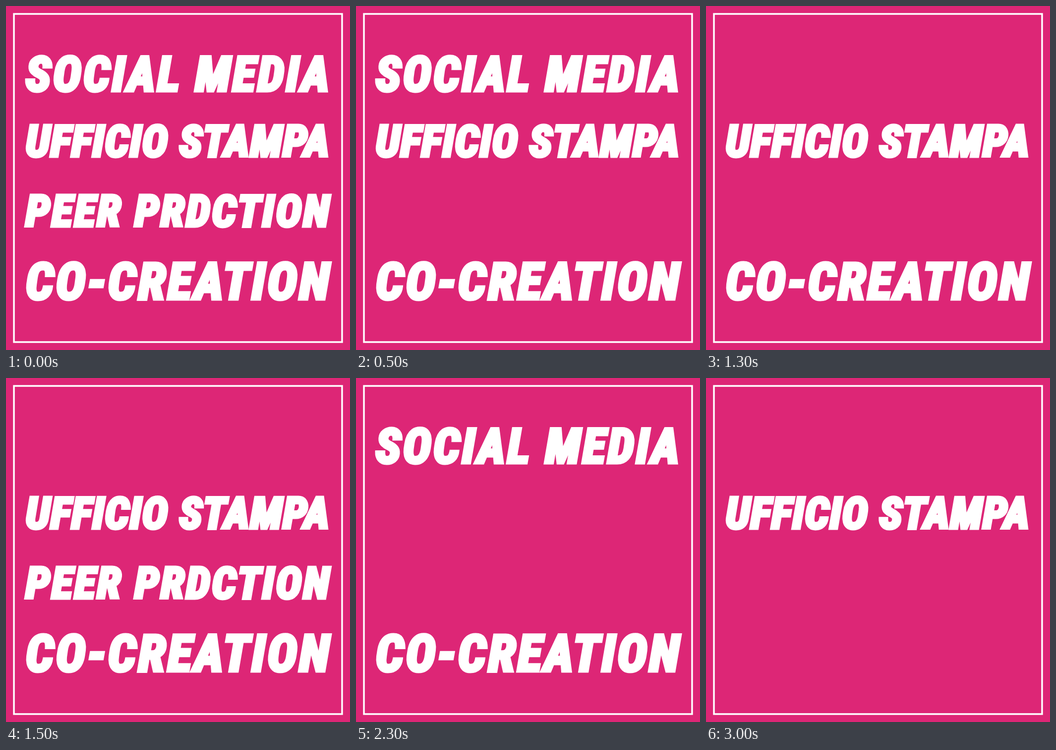
An HTML page that plays this animation: 694x694 px, repeating every 3.5 s.

```html
<!DOCTYPE html>
<html lang="it">
<head>
<meta charset="utf-8">
<title>Services</title>
<style>
html, body { margin: 0; height: 100%; overflow: hidden; background: #dd2676; }
svg { display: block; width: 100vw; height: 100vh; }
text {
  fill: #fff;
  stroke: #fff;
  stroke-width: 7;
  font-family: "Roboto Condensed", Roboto, sans-serif;
  font-weight: 700;
  font-style: italic;
  font-stretch: condensed;
  animation: 3.5s step-end infinite;
}
.frame { fill: none; stroke: #fff; stroke-width: 3.5; }
.social { font-size: 96px; animation-name: social; }
.press, .peer { font-size: 87px; }
.press { animation-name: press; }
.peer { animation-name: peer; }
.co { font-size: 101px; animation-name: co; }
@keyframes social {
  0%, 57.1429% { visibility: visible; }
  28.5714%, 85.7143%, 100% { visibility: hidden; }
}
@keyframes press {
  0%, 85.7143%, 100% { visibility: visible; }
  57.1429% { visibility: hidden; }
}
@keyframes peer {
  0%, 42.8571% { visibility: visible; }
  14.2857%, 57.1429%, 100% { visibility: hidden; }
}
@keyframes co {
  0% { visibility: visible; }
  71.4286%, 100% { visibility: hidden; }
}
</style>
</head>
<body>
<svg viewBox="0 0 694 694">
  <rect class="frame" x="16" y="16" width="662" height="662"/>
  <text class="social" x="40" y="170.5">SOCIAL MEDIA</text>
  <text class="press" x="40" y="302.5">UFFICIO STAMPA</text>
  <text class="peer" x="40" y="443.5">PEER PRDCTION</text>
  <text class="co" x="40" y="590.5">CO-CREATION</text>
</svg>
<script>
// Track every line so that it fills the same column.
const column = 612;
for (const line of document.querySelectorAll("text")) {
  const gaps = line.textContent.length - 1;
  const spare = column - line.getComputedTextLength();
  line.style.letterSpacing = `${spare / gaps}px`;
}
</script>
</body>
</html>
```
